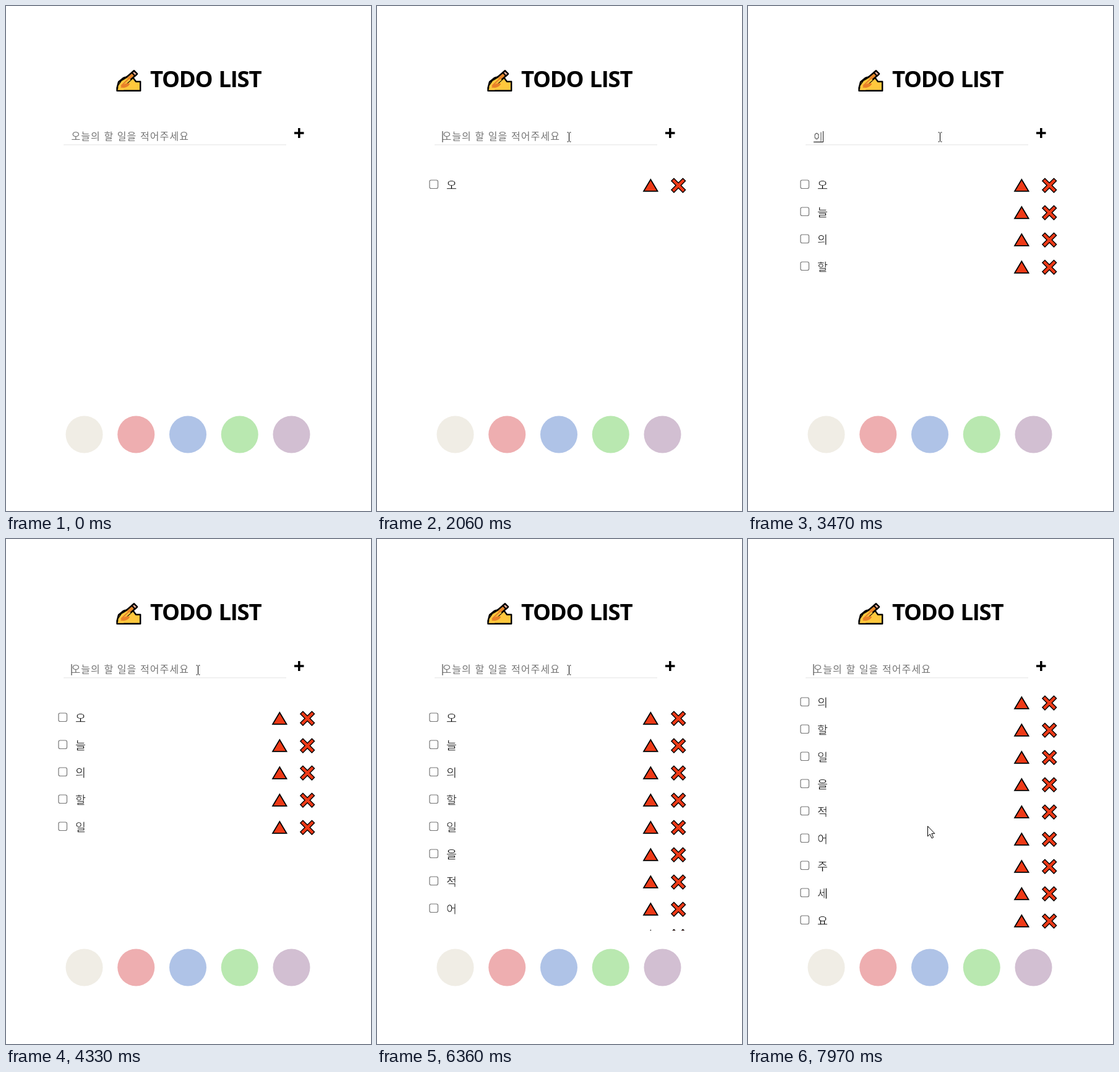
Recreate the animation shown at these times as an HTML page. Size 590 by 815 pixels, loop 8 s.

```html
<!DOCTYPE html>
<html lang="ko">
<head>
<meta charset="utf-8">
<title>Todo list</title>
<style>
  html, body { margin: 0; width: 100%; height: 100%; overflow: hidden; background: #fff; }
  svg { display: block; }
  text { font-family: "Noto Sans CJK KR", "Noto Sans CJK", sans-serif; font-weight: 300; }
  .title { font: 700 36.5px "Open Sans", "Noto Sans", sans-serif; letter-spacing: -1.3px; word-spacing: 2px; }
  .field { font-size: 16px; letter-spacing: 1.08px; }
  .item { font-size: 18.5px; }
  /* A thin white edge gives the strokes a light weight. */
  .item, #typed { stroke: #fff; stroke-width: .45px; }
</style>
</head>
<body>
<svg width="590" height="815" viewBox="0 0 590 815">
  <defs>
    <clipPath id="listBox"><rect x="80" y="246" width="430" height="386"/></clipPath>
    <g id="controls">
      <rect x="85" y="281" width="13.5" height="13.5" rx="2.5" fill="#fff" stroke="#767676" stroke-width="1.2"/>
      <path d="M442.3 280L453.5 298.8H431.1Z" fill="#ee3a17" stroke="#000" stroke-width="1.8"/>
      <g fill="none">
        <path d="M477.4 279.8l19.6 19.6m0-19.6l-19.6 19.6" stroke="#000" stroke-width="7.2"/>
        <path d="M478.4 280.8l17.6 17.6m0-17.6l-17.6 17.6" stroke="#ee3a17" stroke-width="4.4"/>
      </g>
    </g>
  </defs>

  <g stroke="#000" stroke-width="2.4" stroke-linejoin="round">
    <path d="M179.5 136.8V132L182 122.5 190 116 203 112.5 210 122H217.2V136.8Z" fill="#ffc83d"/>
    <path d="M180.5 132.5L185 123 207 104.5 212 109.5 190 129.5Z" fill="#e8912d"/>
    <path d="M203.5 107.5L207 104.5 212 109.5 208.5 113Z" fill="#f5b5a0"/>
    <path d="M181 135.6L181.5 129 187 121 195 116.5 202 119 190 129.5 199 126 196 131 190 135.6Z" fill="#ffc83d" stroke="none"/>
    <path d="M186 129L205 111M186 131.5Q193 124 199 126Q196 131 188 131" fill="#e8802a" stroke="#e8802a" stroke-width="2"/>
  </g>
  <text class="title" x="233" y="131">TODO LIST</text>

  <rect x="93" y="223" width="360" height="2" fill="#f1f1f1"/>
  <path d="M466 205H481.5M473.8 197V213" stroke="#000" stroke-width="3.5"/>
  <text id="hint" class="field" x="105.5" y="216" fill="#757575">오늘의 할 일을 적어주세요</text>
  <g id="typing">
    <text id="typed" class="field" x="106" y="217"></text>
    <rect x="106" y="219" width="15.5" height="1"/>
  </g>
  <rect id="caret" y="202" width="1" height="18" fill="#222"/>

  <g clip-path="url(#listBox)"><g id="list"></g></g>
  <g id="swatches"></g>

  <path id="beam" d="M-3 -7.5H-1M1 -7.5H3M0 -7V7M-3 7.5H-1M1 7.5H3" fill="none" stroke="#000"/>
  <path id="arrow" d="M.5 .5V16.8L4.2 13.3 7 19.8 9.6 18.7 6.9 12.3H11.8Z" fill="#fff" stroke="#000"/>
</svg>
<script>
const $ = id => document.getElementById(id);
const LOOP = 8000, TICK = 1000 / 15, ROW = 44;
const WORDS = [..."오늘의할일을적어주세요"];

// Time and field content; "+" adds the word to the list.
const KEYS = `1460ㅇ 1860오 2060+ 2130ㄴ 2200느 2270늘 2400+ 2530ㅇ 2600으 2730의 2800+
  3000ㅎ 3070하 3200할 3270+ 3400ㅇ 3470이 3600일 3670+ 3800ㅇ 3870오 4200ㅇ 4330
  4400ㅇ 4530으 4600을 4670+ 4800ㅈ 4870저 4940적 5070+ 5270ㅇ 5340어 5410+
  5610ㅈ 5680주 5750+ 6160ㅅ 6230세 6360+ 6560ㅇ 6630요 6760+`
  .split(/\s+/).map(k => ({ at: parseInt(k), text: k.slice(4) }));

// Pointer stops: time, x, y.
const PATH = [[70, 479, 600], [330, 432, 420], [600, 345, 240], [730, 316, 206], [870, 308, 212],
  [935, 308, 212], [1000, 310, 211], [7160, 310, 211], [7430, 291, 455], [7770, 291, 455], [7970, 290, 464]];

$("list").innerHTML = WORDS.map((w, i) =>
  `<g transform="translate(0 ${i * ROW})"><use href="#controls"/><text class="item" x="112" y="295.5">${w}</text></g>`).join("");
$("swatches").innerHTML = ["#f0ede5", "#eeaeb0", "#afc3e7", "#b9e8b0", "#d2bfd2"].map((c, i) =>
  `<circle cx="${126.5 + i * 83.75}" cy="691.5" r="30" fill="${c}"/>`).join("");
const rows = [...$("list").children];

const show = (el, on) => el.setAttribute("visibility", on ? "visible" : "hidden");
const move = (el, x, y) => el.setAttribute("transform", `translate(${x} ${y})`);
const progress = (t, a, b) => Math.min(1, Math.max(0, (t - a) / (b - a)));

function pointerAt(t) {
  const next = PATH.findIndex(p => p[0] > t);
  const n = next < 0 ? PATH.length - 1 : Math.max(1, next);
  const [a, b] = [PATH[n - 1], PATH[n]], p = progress(t, a[0], b[0]);
  return [1, 2].map(k => Math.round(a[k] + (b[k] - a[k]) * p));
}

function draw(t) {
  const done = KEYS.filter(k => k.at <= t);
  const last = done.at(-1) || { at: 870, text: "" };
  const text = last.text === "+" ? "" : last.text;
  const count = done.filter(k => k.text === "+").length;

  $("typed").textContent = text;
  show($("typing"), text);
  show($("hint"), !text);
  show($("caret"), t >= 870 && Math.floor((t - last.at + 40) / 500) % 2 === 0);
  $("caret").setAttribute("x", text ? 121 : 105.5);
  rows.forEach((r, i) => show(r, i < count));

  // The pointer and the scroll advance at 15 steps per second.
  const step = Math.floor((t + 8) / TICK) * TICK + 4;
  const p = progress(step, 7400, 7600);
  move($("list"), 0, -Math.round(113 * p * p * (3 - 2 * p)));

  const [x, y] = pointerAt(step);
  const inField = x < 453 && y < 225;
  move($("beam"), x + .5, y + .5);
  move($("arrow"), x, y);
  show($("beam"), t >= 70 && inField);
  show($("arrow"), t >= 70 && !inField);
}

function frame() {
  draw(performance.now() % LOOP);
  requestAnimationFrame(frame);
}
frame();
</script>
</body>
</html>
```
